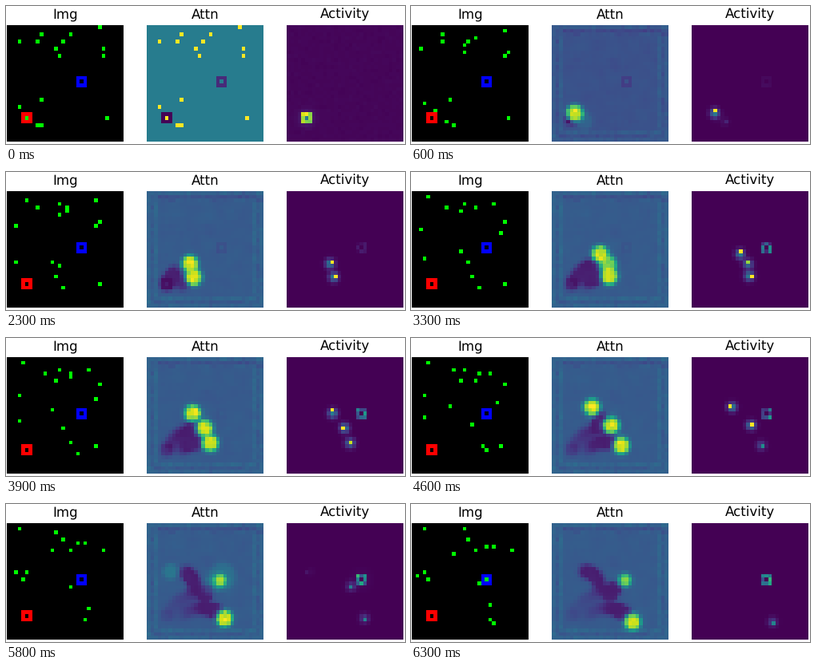
Recreate the animation shown at these times as a matplotlib script. Size 499 by 173 pixels, loop 6.4 s.

```python
import numpy as np
import matplotlib.pyplot as plt
from matplotlib.animation import FuncAnimation

W, H, DPI = 499, 173, 100
N, FRAMES, STEP_MS = 32, 64, 100
SIDE, TOP = 146, 24
RED, BLUE = (5, 25), (20, 15)
TRAIL_DELAY, TRAIL_DECAY = 11, .95

rng = np.random.default_rng(4)
yy, xx = np.mgrid[0:N, 0:N]
steps = np.arange(FRAMES)


def fade(start, end):
    """Eased rise from 0 to 1 over all frames."""
    u = np.clip((steps - start) / (end - start), 0, 1)
    return u * u * (3 - 2 * u)


def curve(*points, times=(0, 13, 23, 46, 63)):
    """Smooth path through one (column, row) point per time."""
    t, p = np.array(times, float), np.array(points, float)
    slope = np.gradient(p, t, axis=0)
    i = np.clip(np.searchsorted(t, steps, side="right") - 1, 0, len(t) - 2)
    h = (t[i + 1] - t[i])[:, None]
    u = (steps - t[i])[:, None] / h
    return ((1 + 2*u) * (1 - u)**2 * p[i] + u * (1 - u)**2 * h * slope[i]
            + u**2 * (3 - 2*u) * p[i + 1] + u**2 * (u - 1) * h * slope[i + 1])


def drift(start, end):
    """Straight way from start to end with a random sway."""
    u = (steps / (FRAMES - 1))[:, None]
    sway = (rng.normal(0, 1.2, 2) * np.sin(np.pi * u)
            + rng.normal(0, .7, 2) * np.sin(2 * np.pi * u))
    return np.clip(np.array(start) * (1 - u) + np.array(end) * u + sway, 0, 27)


def dist(center):
    return np.hypot(xx - center[0], yy - center[1])


def gauss(center, sigma):
    return np.exp(-dist(center)**2 / (2 * sigma**2))


def blob(center, radius=2.2):
    return 1 / (1 + np.exp((dist(center) - radius) * 3))


def ring(center):
    return np.maximum(abs(xx - center[0]), abs(yy - center[1])) == 1


def soft_noise(amount):
    """Noise averaged over neighbouring cells."""
    noise = rng.normal(0, amount, (N, N))
    for axis in (0, 1):
        noise = (np.roll(noise, 1, axis) + noise + np.roll(noise, -1, axis)) / 2
    return noise


# Dots that get followed
upper = curve((5, 25), (8, 21), (12, 19), (10, 13), (3, 13))
lower = curve((8, 27), (10, 24), (13, 23), (19, 24), (22, 27))
middle = curve((9, 20), (12, 20), (14, 20), (16, 18), (18, 16))

# Free dots, by first and last cell
free = [drift(*ends) for ends in (
    ((25, 0), (22, 6)), ((9, 2), (3, 1)), ((17, 2), (20, 6)),
    ((3, 4), (1, 14)), ((8, 4), (14, 1)), ((15, 4), (15, 4)),
    ((13, 6), (17, 7)), ((14, 8), (11, 8)), ((26, 6), (27, 7)),
    ((26, 8), (20, 15)), ((27, 25), (21, 22)), ((3, 22), (4, 15)),
    ((9, 27), (21, 26)))]
walkers = [upper, lower, middle, *free]

# (path, activity level, attention level)
tracked = [
    (upper, 1 - fade(46, 60), 1 - fade(52, 60)),
    (lower, fade(5, 10) * (1 - .55 * fade(36, 48)), fade(5, 10)),
    (middle, fade(27, 35) * (1 - fade(52, 63)), fade(28, 35) * (1 - fade(52, 60))),
]
goal_level = .03 + .5 * fade(20, 36) + .35 * fade(54, 63)
goal_glow = .27 * fade(46, 53) * (1 - fade(53, 61))
goal_spot = .55 * fade(46, 60)
base_level = .25 + .035 * fade(8, 24)

# Mottled background with a frame along the border
edge = np.minimum.reduce([xx, yy, N - 1 - xx, N - 1 - yy])
texture = soft_noise(.006) + .03 * (edge == 0) + .04 * (edge == 2)
texture += (edge < 3) * rng.normal(0, .012, (N, N))
texture -= .04 * ((yy == 1) | (yy == 2)) * (xx > 2)


def dot_mask(k):
    mask = np.zeros((N, N), bool)
    for path in walkers:
        col, row = np.rint(path[k]).astype(int)
        mask[row, col] = True
    return mask


def scene(dots):
    img = np.zeros((N, N, 3))
    img[dots] = 0, 1, 0
    img[ring(RED)] = 1, 0, 0
    img[ring(BLUE)] = 0, 0, 1
    return img


def first_attention(dots):
    att = np.where(dots, 1.0, .42)
    att[ring(RED)] = .01
    att[ring(BLUE)] = .12
    return att


def attention(k, trail):
    att = base_level[k] + texture + soft_noise(.003)
    att -= np.minimum(.2, .045 * trail)
    att -= ring(RED) * .15 * np.exp(-k / 18)
    att -= ring(BLUE) * .08 * max(0, 1 - k / 45)
    att += goal_glow[k] * blob((20.2, 14.2), 3.8)
    att += goal_spot[k] * blob((19.6, 15.2), 1.6)
    for path, _, level in tracked:
        b = level[k] * blob(path[max(k - 2, 0)])
        att = att * (1 - b) + b * (.95 + rng.normal(0, .03, (N, N)))
    return att


def first_activity():
    act = .015 + rng.normal(0, .003, (N, N)) + .1 * gauss(RED, 1.5)
    act[ring(RED)] = rng.uniform(.75, 1, 8)
    act[RED[1], RED[0]] = .4
    return act


def activity(k):
    act = .15 * goal_glow[k] * blob(BLUE, 3.5)
    act += ring(BLUE) * goal_level[k] * rng.uniform(.2, 1.1, (N, N))
    for path, level, _ in tracked:
        act += level[k] * .42 * gauss(path[max(k - 2, 0)], .9)
        col, row = np.rint(path[k]).astype(int)
        act[row, col] = max(act[row, col], level[k])
    return act


def build():
    trail = np.zeros((N, N))
    out = []
    for k in steps:
        dots = dot_mask(k)
        if k == 0:
            out.append((scene(dots), first_attention(dots), first_activity()))
        else:
            out.append((scene(dots), attention(k, trail), activity(k)))
        past = max(k - TRAIL_DELAY, 0)
        trail = trail * TRAIL_DECAY
        for path, _, level in tracked:
            trail += level[past] * blob(path[past], 1.9)
    return out


data = build()

plt.rcParams["font.family"] = "DejaVu Sans"
plt.rcParams["text.hinting"] = "none"
fig = plt.figure(figsize=(W / DPI, H / DPI), dpi=DPI, facecolor="white")
panels = []
for left, title, first in zip((1, 176, 351), ("Img", "Attn", "Activity"), data[0]):
    ax = fig.add_axes([left / W, 1 - (TOP + SIDE) / H, SIDE / W, SIDE / H])
    ax.set_title(title, fontsize=12)
    ax.axis("off")
    panels.append(ax.imshow(first, cmap="viridis", vmin=0, vmax=1,
                            interpolation="nearest", aspect="auto"))


def draw(k):
    for panel, values in zip(panels, data[k]):
        panel.set_data(values)
    return panels


anim = FuncAnimation(fig, draw, frames=FRAMES, interval=STEP_MS,
                     repeat=True, repeat_delay=0)
plt.show()
```
